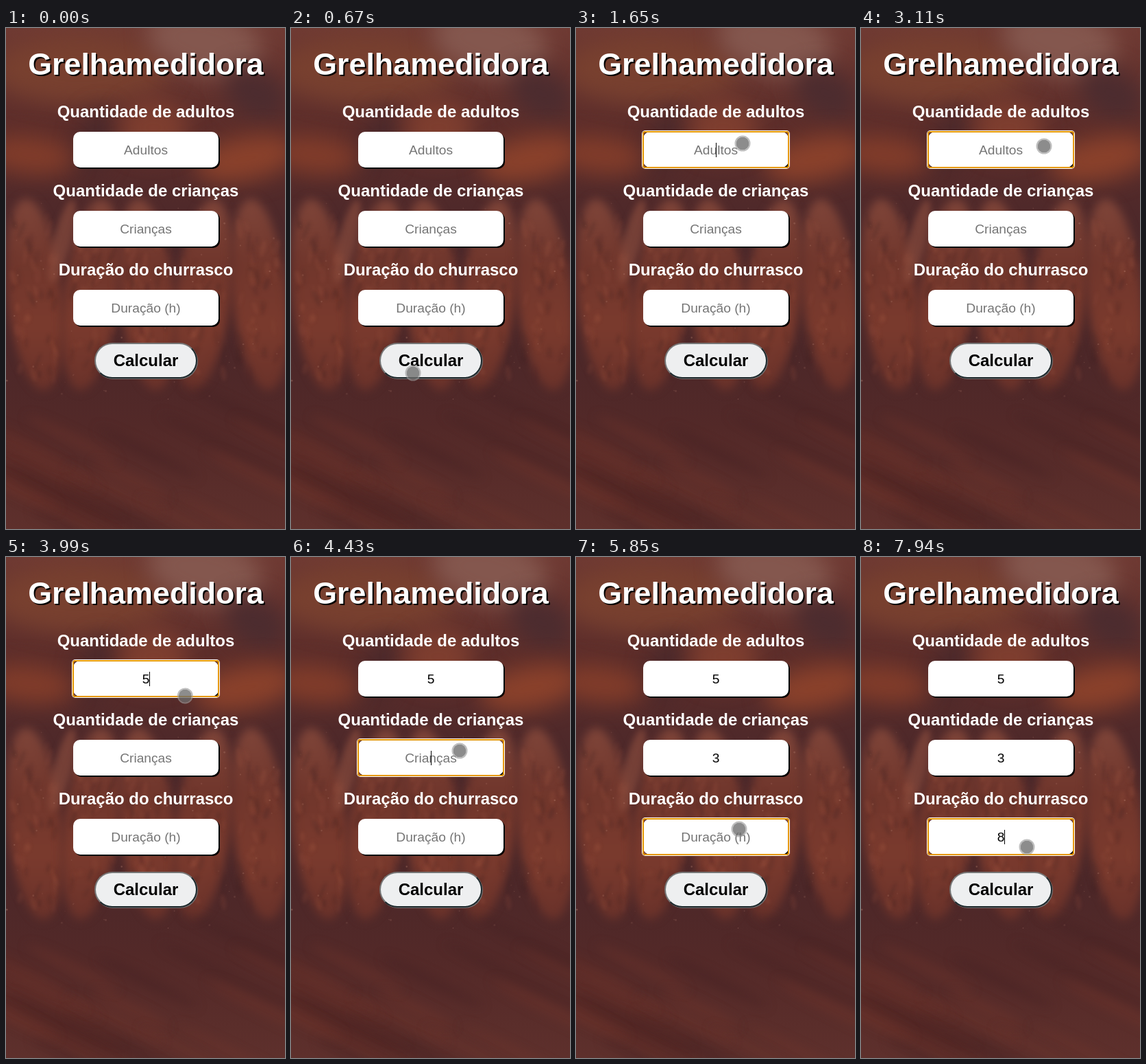
Recreate the animation shown at these times as an HTML page with a canvas. Size 407x729 px, loop 8000 ms.

```html
<!DOCTYPE html>
<html lang="pt-BR">
<head>
<meta charset="utf-8">
<title>Grelhamedidora</title>
<style>
html, body { margin: 0; width: 100%; height: 100%; overflow: hidden; background: #55292a; }
#stage {
  position: relative; width: 407px; height: 729px; overflow: hidden;
  font-family: "Liberation Sans", Arial, sans-serif; text-align: center; white-space: nowrap;
}
#stage > * { position: absolute; box-sizing: border-box; }
canvas { left: 0; top: 0; }
h1, h2 { margin: 0; left: 0; width: 408px; color: #fff; font-weight: bold; }
h1 { top: 26px; font-size: 44.8px; line-height: 52px; text-shadow: 2px 2px #000; }
h2 { font-size: 24px; line-height: 27px; }
.field {
  left: 98px; width: 212px; height: 52px; border-radius: 10px; background: #fff;
  box-shadow: 2px 2px #000; font-size: 19.2px; line-height: 53px; color: #000;
}
.field.empty { color: #757575; }
.field.focus::after {
  content: ""; position: absolute; inset: -1px; border: 2px solid #e59700;
  border-radius: 4px; box-shadow: 0 0 0 1px #fff;
}
#button {
  left: 129px; top: 458px; width: 150px; height: 52px; border-radius: 26px;
  border: 2px solid; border-color: #767676 #1d292c #1d292c #767676; background: #eeeff0;
  box-shadow: 1px 1px #757071;
  font-size: 24px; font-weight: bold; line-height: 47px; color: #000;
}
#caret { width: 1px; height: 21px; background: #000; }
#dot {
  left: -11.5px; top: -11.5px; width: 23px; height: 23px; border-radius: 50%;
  background: rgba(108, 108, 108, .78); background-clip: padding-box;
  border: 2px solid rgba(155, 155, 155, .65);
}
</style>
</head>
<body>
<div id="stage">
  <canvas id="photo" width="407" height="729"></canvas>
  <h1>Grelhamedidora</h1>
  <div id="button">Calcular</div>
  <div id="caret"></div>
  <div id="dot"></div>
</div>
<script>
const stage = document.getElementById('stage');
const caret = document.getElementById('caret');
const dot = document.getElementById('dot');
const ctx = document.getElementById('photo').getContext('2d');

let seed = 11;
const rnd = (a, b) => {
  seed = (seed * 16807) % 2147483647;
  return a + (b - a) * seed / 2147483647;
};

function blob(x, y, rx, ry, turn, color) {
  ctx.fillStyle = color;
  ctx.beginPath();
  ctx.ellipse(x, y, rx, ry, turn, 0, Math.PI * 2);
  ctx.fill();
}

function fade(top, bottom, ...colors) {
  const g = ctx.createLinearGradient(0, top, 0, bottom);
  colors.forEach((c, i) => g.addColorStop(i / (colors.length - 1), c));
  return g;
}

function drawPhoto() {
  ctx.fillStyle = fade(0, 729, '#6f3a33', '#5c2d2a', '#4c282a', '#4a2729', '#532928', '#5e302c');
  ctx.fillRect(0, 0, 407, 729);

  // embers and smoke
  ctx.filter = 'blur(16px)';
  blob(110, 60, 130, 50, 0, '#78402f');
  blob(290, 20, 85, 48, .2, '#84574e');
  blob(365, 95, 50, 35, .5, '#4c2c2f');
  blob(130, 165, 25, 50, .3, '#4a292b');
  blob(35, 185, 65, 28, .1, '#813c2a');
  blob(350, 190, 75, 32, -.2, '#8a412b');
  blob(215, 145, 50, 40, 0, '#7e3e2f');

  // five chunks of meat, leaning in turn
  for (let i = 0; i < 5; i++) {
    const x = 42 + 82 * i, lean = i % 2 ? .12 : -.1;
    ctx.filter = 'blur(7px)';
    blob(x, 388, 40, 140, lean, fade(250, 525, '#7f4539', '#70362c', '#7a3a2d', '#6a322a'));
    ctx.filter = 'blur(2px)';
    for (let k = 0; k < 40; k++) {
      const tone = k % 2 ? '165,88,66' : '56,28,30';
      blob(x + rnd(-32, 32), rnd(275, 505), rnd(2, 5), rnd(5, 16), lean + rnd(-.3, .5),
        `rgba(${tone},${rnd(.08, .24)})`);
    }
  }
  ctx.filter = 'blur(5px)';
  blob(82, 310, 13, 62, .25, 'rgba(145,80,64,.6)');

  // board grain
  ctx.filter = 'blur(8px)';
  for (let i = 0; i < 22; i++) {
    blob(rnd(0, 407), rnd(575, 740), rnd(60, 150), rnd(4, 9), .46,
      i % 3 ? 'rgba(122,56,45,.34)' : 'rgba(60,30,32,.35)');
  }

  // wet sparkles
  ctx.filter = 'blur(.7px)';
  for (let i = 0; i < 70; i++) {
    const r = rnd(.6, 1.6);
    blob(rnd(0, 407), rnd(255, 540), r, r, 0, `rgba(185,132,116,${rnd(.1, .4)})`);
  }
  ctx.filter = 'none';
}

function add(tag, className, top, text) {
  const el = document.createElement(tag);
  el.className = className;
  el.style.top = top + 'px';
  el.textContent = text;
  stage.insertBefore(el, caret);
  return el;
}

const BLINK = 485;
const fields = [
  { label: 'Quantidade de adultos', hint: 'Adultos', value: '5', focus: 1650, typed: 3680, blur: 4430 },
  { label: 'Quantidade de crianças', hint: 'Crianças', value: '3', focus: 4430, typed: 4490, blur: 5290 },
  { label: 'Duração do churrasco', hint: 'Duração (h)', value: '8', focus: 5360, typed: 7510, blur: 8000 }
];
fields.forEach((f, i) => {
  f.top = 151 + 115 * i;
  add('h2', '', f.top - 43, f.label);
  f.el = add('div', 'field', f.top, f.hint);
});

const moves = [
  { start: 350, end: 600, x: 157, y: 545 },
  { start: 600, end: 670, x: 177.5, y: 501.5 },
  { start: 670, end: 1100, x: 208, y: 167.5 },
  { start: 1100, end: 1230, x: 242.5, y: 167.5 },
  { start: 1950, end: 2240, x: 266.5, y: 171.5 },
  { start: 3840, end: 4280, x: 245.5, y: 281.5 },
  { start: 4800, end: 5140, x: 237.5, y: 395.5 },
  { start: 7810, end: 7940, x: 241.5, y: 421.5 }
];

function pointer(t) {
  let x = 308, y = 714;
  for (const m of moves) {
    const u = Math.min(1, Math.max(0, (t - m.start) / (m.end - m.start)));
    const ease = u * u * (3 - 2 * u);
    x += (m.x - x) * ease;
    y += (m.y - y) * ease;
  }
  return `translate(${x}px, ${y}px)`;
}

function render(t) {
  caret.hidden = true;
  for (const f of fields) {
    const typed = t >= f.typed;
    const active = t >= f.focus && t < f.blur;
    f.el.textContent = typed ? f.value : f.hint;
    f.el.classList.toggle('empty', !typed);
    f.el.classList.toggle('focus', active);
    if (active) {
      const since = t - (typed ? f.typed : f.focus);
      caret.hidden = Math.floor(since / BLINK) % 2 === 1;
      caret.style.left = (typed ? 209 : 204) + 'px';
      caret.style.top = f.top + 16 + 'px';
    }
  }
  dot.hidden = t < moves[0].start;
  dot.style.transform = pointer(t);
}

drawPhoto();
const start = performance.now();
function tick() {
  render((performance.now() - start) % 8000);
  requestAnimationFrame(tick);
}
tick();
</script>
</body>
</html>
```
